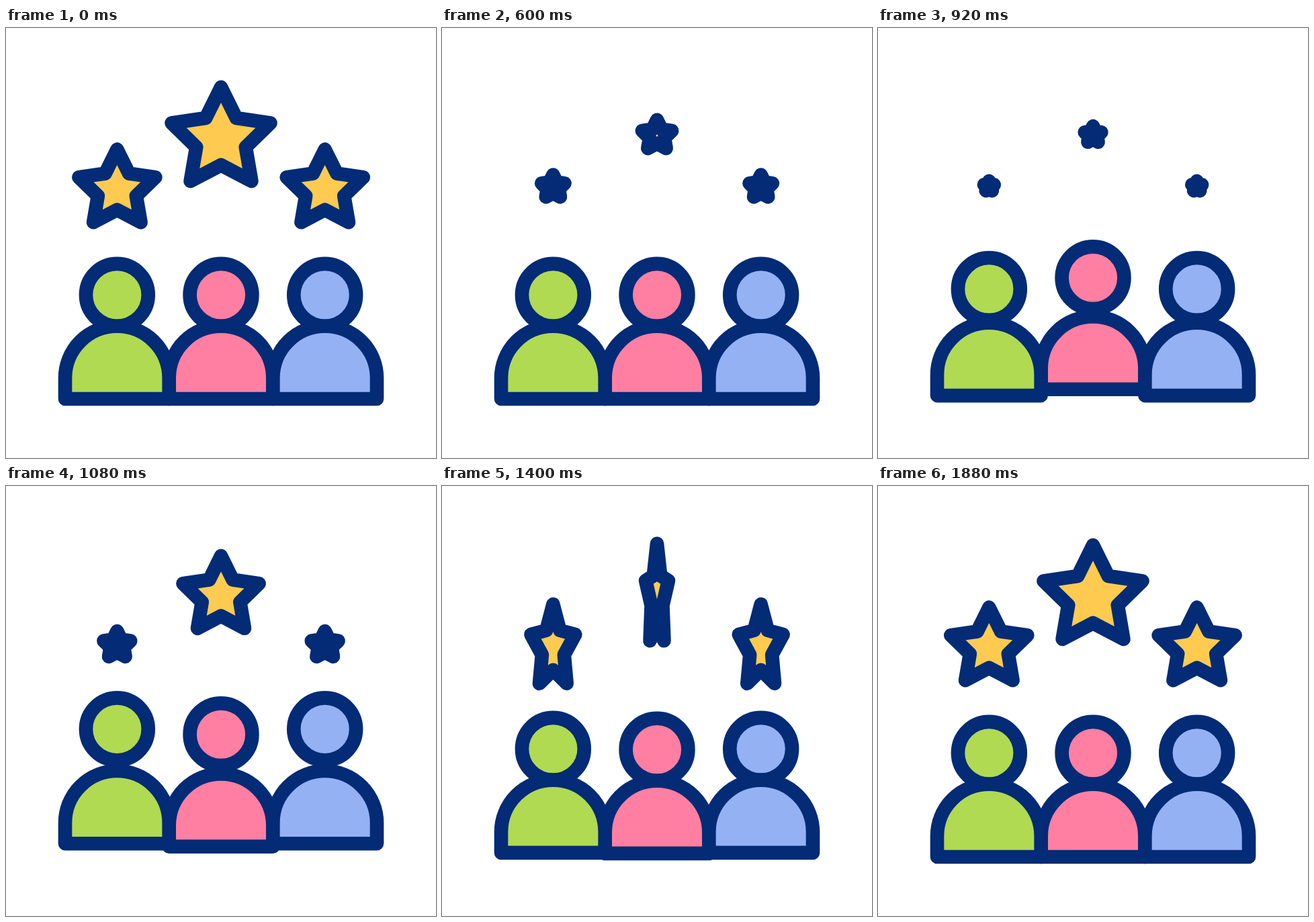
An HTML page with a canvas that plays this animation: 640x640 px, repeating every 2.2 s.

```html
<!DOCTYPE html>
<html lang="en">
<head>
<meta charset="utf-8">
<title>Team rating</title>
<style>
  html, body { margin: 0; width: 100%; height: 100%; overflow: hidden; background: #fff; }
  canvas { display: block; }
</style>
</head>
<body>
<canvas id="stage" width="640" height="640"></canvas>
<script>
const ctx = document.getElementById('stage').getContext('2d');
const LOOP = 2200, STEP = 40;
const LAG = 75;               // the outer figures and stars follow the middle ones
const U = 464 / 45;           // grid unit of the icon
const NAVY = '#032b76', YELLOW = '#fecb50';
const SMALLEST = 0.13, LARGEST = 1.1;

const people = [
  { x: 320, color: '#ff7fa2', lag: 0 },
  { x: 320 - 15 * U, color: '#b0da52', lag: LAG },
  { x: 320 + 15 * U, color: '#94b1f3', lag: LAG }
];
const stars = [
  { x: 320, top: 88, radius: 7.5 * U, lag: 0 },
  { x: 320 - 15 * U, top: 180.7, radius: 60, lag: LAG },
  { x: 320 + 15 * U, top: 180.7, radius: 60, lag: LAG }
];

const clamp = v => Math.min(1, Math.max(0, v));
const progress = (t, from, to) => clamp((t - from) / (to - from));
const mix = (a, b, k) => a + (b - a) * k;

// Eased value of a timing curve with handles (x1, 0) and (x2, 1).
function ease(p, x1, x2) {
  let lo = 0, hi = 1;
  for (let i = 0; i < 24; i++) {
    const s = (lo + hi) / 2, r = 1 - s;
    const x = 3 * r * r * s * x1 + 3 * r * s * s * x2 + s * s * s;
    if (x < p) lo = s; else hi = s;
  }
  return lo * lo * (3 - 2 * lo);
}

function starScale(t, lag) {
  const own = t - lag;
  if (t < 760) return mix(1, SMALLEST, ease(progress(t, 200, 667), 0.71, 0.84));
  if (own < 1267) return mix(SMALLEST, LARGEST, ease(progress(own, 833, 1267), 0.67, 0.36));
  return mix(LARGEST, 1, ease(progress(own, 1267, 1487), 0.42, 0.58));
}

const starSpin = t => Math.cos(Math.PI * progress(t, 1100, 1800));

// Height of a figure part: one tall hop, then a low bounce.
function hop(t, height) {
  const u = clamp(Math.abs(t - 1005) / 240);
  const v = clamp(Math.abs(t - 1322) / 145);
  return Math.max(height * (1 + Math.cos(Math.PI * u)) / 2, 6.1 * (1 - v ** 3));
}

function paint(color) {
  ctx.fillStyle = color;
  ctx.fill();
  ctx.stroke();
}

function drawPerson({ x, color, lag }, t) {
  const headY = 320 + 7.5 * U - hop(t - lag, 35.5);
  const rise = hop(t - lag, 19.7);
  const half = 7.5 * U;

  ctx.beginPath();
  ctx.arc(x, headY, 4.5 * U, 0, 2 * Math.PI);
  ctx.closePath();
  paint(color);

  ctx.beginPath();
  ctx.moveTo(x - half, 552 - rise);
  ctx.arc(x, 552 - 3 * U - rise, half, Math.PI, 2 * Math.PI);
  ctx.lineTo(x + half, 552 - rise);
  ctx.closePath();
  paint(color);
}

function drawStar({ x, top, radius, lag }, t) {
  const sy = starScale(t, lag);
  const sx = sy * starSpin(t - lag);
  const halfHeight = radius * (1 + Math.cos(Math.PI / 5)) / 2;

  ctx.beginPath();
  for (let i = 0; i < 10; i++) {
    const r = i % 2 ? radius / 2 : radius;
    const a = i * Math.PI / 5;
    const px = r * Math.sin(a);
    const py = radius - halfHeight - r * Math.cos(a);
    ctx.lineTo(x + px * sx, top + halfHeight + py * sy);
  }
  ctx.closePath();
  paint(YELLOW);
}

function draw(t) {
  ctx.fillStyle = '#fff';
  ctx.fillRect(0, 0, 640, 640);
  ctx.strokeStyle = NAVY;
  ctx.lineWidth = 2 * U;
  ctx.lineJoin = ctx.lineCap = 'round';
  people.forEach(p => drawPerson(p, t));
  stars.forEach(s => drawStar(s, t));
}

const start = performance.now();
function tick() {
  const t = (performance.now() - start) % LOOP;
  draw(Math.floor(t / STEP) * STEP);
  requestAnimationFrame(tick);
}
tick();
</script>
</body>
</html>
```
